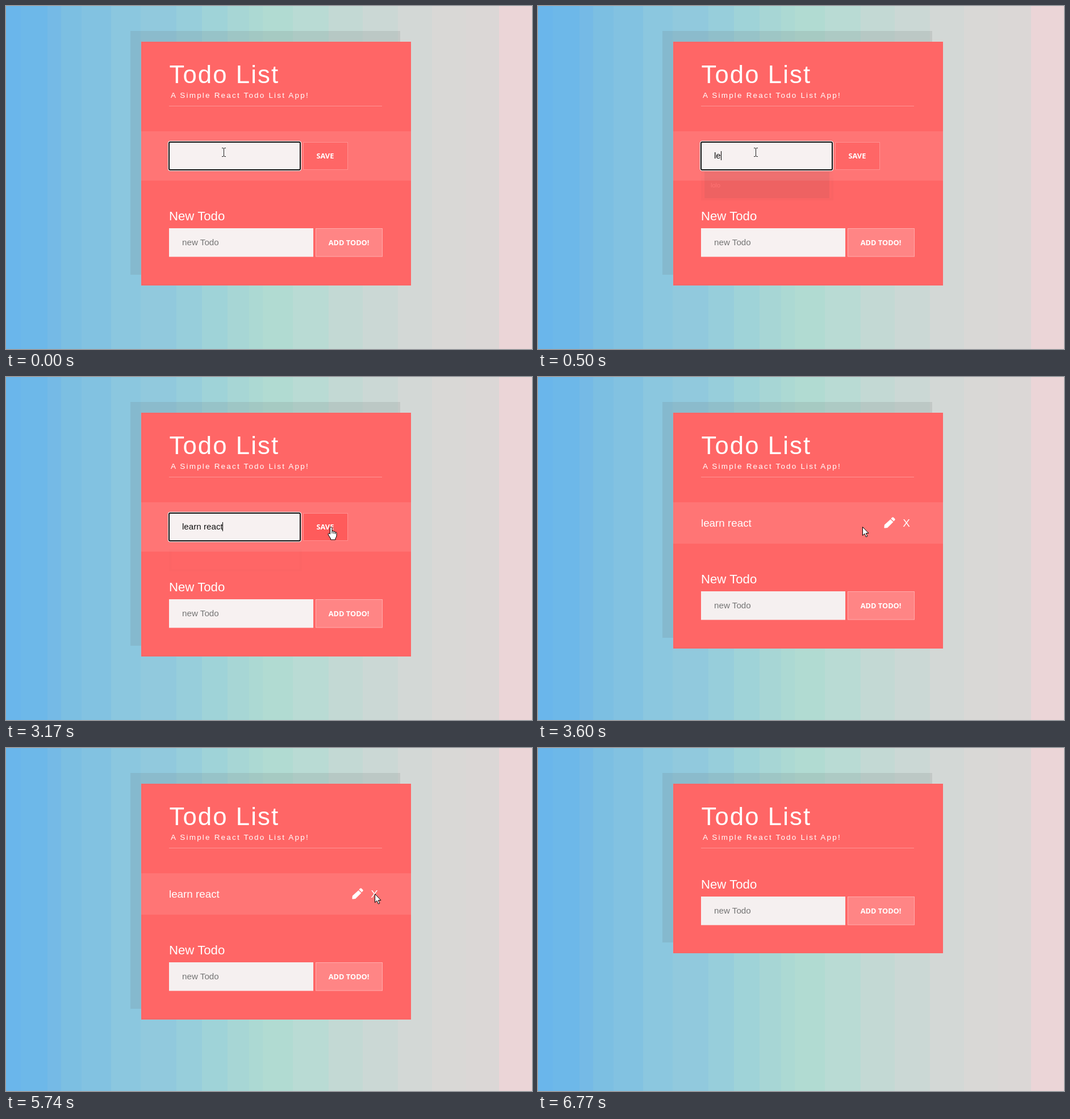
Animation, 926 px wide and 605 px high, one loop 7.42 s. Source, as an HTML page:

```html
<!DOCTYPE html>
<html lang="en">
<head>
<meta charset="utf-8">
<title>Todo List</title>
<style>
  html, body { margin: 0; width: 100%; height: 100%; overflow: hidden; }
  svg { display: block; width: 100%; height: 100%; font-family: "Liberation Sans", Arial, sans-serif; fill: #fff; }
  .button { font: bold 12.8px "Open Sans", sans-serif; }
  .field { font-size: 15.2px; }
  .cursor { fill: #fff; stroke: #000; stroke-linejoin: round; }
</style>
</head>
<body>
<svg viewBox="0 0 926 605">
  <g id="backdrop"></g>
  <rect id="shadow" x="219" y="44" width="475" fill="#646464" fill-opacity=".14"/>
  <rect id="card" x="238" y="63" width="475" fill="#f66"/>

  <text x="287.5" y="136" font-size="43.7" letter-spacing="2.1">Todo List</text>
  <text x="290" y="162" font-size="13.5" letter-spacing="2.18">A Simple React Todo List App!</text>
  <rect x="287" y="176" width="375" height="1" opacity=".3"/>

  <g id="editor">
    <rect x="238" y="221" width="475" height="87" fill="#ff7575"/>
    <rect x="285" y="238" width="235" height="53" rx="4"/>
    <rect x="287" y="240" width="231" height="49" rx="2" fill="#f7f1f1" stroke="#101010" stroke-width="2"/>
    <text id="draft" class="field" x="310" y="269" fill="#111"></text>
    <rect id="caret" y="256" width="1" height="16" fill="#000"/>
    <rect id="save" x="523.5" y="240.5" width="78" height="48" stroke="#ff9090"/>
    <text class="button" x="546.5" y="268.5">SAVE</text>
    <rect id="residue" x="289.5" y="306" width="229" height="35" fill="none" stroke="#000" stroke-width="4" opacity=".012"/>
    <g id="popup">
      <rect x="287" y="292" width="233" height="51" fill="#000" opacity=".12"/>
      <rect x="293" y="292" width="220" height="47" fill="#3b3b3b"/>
      <text x="304" y="320" font-size="11">lolo</text>
    </g>
  </g>

  <g id="item">
    <rect x="238" y="221" width="475" height="73" fill="#ff7575"/>
    <text x="287" y="264" font-size="18.8">learn react</text>
    <path transform="translate(609.3 247)" d="M11.3 3.9 16.1 8.7 5.8 19 1.4 19.5Q-.1 19.7 .1 18.2L.6 13.8ZM18.8 3.1 16.6.8Q15.3-.4 14 .8L12.1 2.8 16.9 7.6 18.8 5.6Q20 4.4 18.8 3.1Z"/>
    <text x="642.3" y="264" font-size="19">X</text>
  </g>

  <g id="form">
    <text x="287" y="378" font-size="22.2">New Todo</text>
    <rect id="newField" x="287" y="392" width="254" height="50.4"/>
    <text class="field" x="310" y="422" fill="#757575">new Todo</text>
    <rect x="545.5" y="392.5" width="117" height="49.4" fill="#ff8585" stroke="#ffadad"/>
    <text class="button" x="567.7" y="421.5">ADD TODO!</text>
  </g>

  <g id="beam"><path d="M-3-7.5H-1L.5-6.5 2-7.5H4M.5-6.5V6.5M-3 7.5H-1L.5 6.5 2 7.5H4" fill="none" stroke="#222"/></g>
  <g id="arrow" class="cursor"><path d="M.5.5V15.5L4 12.4 6.4 18 8.8 17 6.4 11.5H11Z"/></g>
  <g id="hand" class="cursor">
    <path d="M-1.5 12V1.5Q-1.5-.3 .3-.3T2 1.5V7Q4.3 5.7 5 7.8 7.2 6.8 7.7 8.7 10 8 10 10.5V15Q9.5 18 8 19.5V22H-.5V20L-4.8 13Q-5.3 10.5-3 10.7Z"/>
    <path d="M2 7V11M5 8V11.5M7.7 9V12" fill="none"/>
  </g>
</svg>
<script>
const LOOP = 7420;
const part = Object.fromEntries([...document.querySelectorAll("[id]")].map(el => [el.id, el]));
const show = (el, on) => el.style.display = on ? "" : "none";
const latest = (steps, t) => steps.filter(([start]) => start <= t).pop();

// Left edge and colour of each backdrop stripe
const stripes = [
  [0, "#6ab6eb"], [26, "#6db8e9"], [73, "#75bae6"], [97, "#7cbfe2"], [133, "#82c2e1"],
  [185, "#8bc7df"], [237, "#91c9dd"], [300, "#97cedb"], [345, "#9fd3d8"], [390, "#a7d6d5"],
  [428, "#acd9d3"], [452, "#b1dbd2"], [505, "#b9dbd4"], [568, "#c3d9d4"], [628, "#cbd8d5"],
  [690, "#d3d8d6"], [750, "#d9d8d6"], [810, "#dbd7d6"], [868, "#ebd5d7"]
];
part.backdrop.innerHTML = stripes
  .map(([x, color]) => `<rect x="${x}" width="${926 - x}" height="605" fill="${color}"/>`).join("");

const typing = [
  [0, ""], [250, "l"], [500, "le"], [640, "lea"], [760, "lear"], [1030, "learn"], [1200, "learn "],
  [1640, "learn re"], [1760, "learn rea"], [1880, "learn reac"], [2180, "learn react"]
];
const popupFade = [[0, 0], [380, 1], [500, .08], [640, 0]];
const pointer = [
  [0, "beam", 383, 258], [2930, "beam", 430, 270], [3050, "hand", 531, 275], [3170, "hand", 572, 265],
  [3480, "arrow", 571, 264], [3970, "arrow", 594, 274], [4090, "arrow", 622, 271], [4210, "arrow", 640, 260],
  [4460, "hand", 649, 257], [5740, "arrow", 649, 257], [6140, "arrow", 690, 312], [6260, "arrow", 760, 420],
  [6380, "arrow", 830, 520], [6500, "arrow", 877, 575], [6620, "arrow", 868, 598], [6770, "none", 0, 0]
];
// Start, card height, form offset
const layouts = [[0, 430, 0], [3600, 416, -14], [5860, 299, -130]];

const textWidth = document.createElement("canvas").getContext("2d");
textWidth.font = '15.2px "Liberation Sans", Arial, sans-serif';

function render(t) {
  const [phase, height, offset] = latest(layouts, t);
  part.card.setAttribute("height", height);
  part.shadow.setAttribute("height", height);
  part.form.setAttribute("transform", `translate(0 ${offset})`);
  part.newField.setAttribute("fill", phase ? "#f5f0f0" : "#f7f1f1");
  show(part.editor, phase === 0);
  show(part.item, phase === 3600);

  const draft = latest(typing, t)[1];
  part.draft.textContent = draft;
  part.caret.setAttribute("x", Math.round(310 + textWidth.measureText(draft).width - .3));
  show(part.caret, draft && !(t >= 1030 && t < 1200) && !(t >= 2680 && t < 2930));
  part.popup.setAttribute("opacity", latest(popupFade, t)[1]);
  show(part.residue, t >= 500);
  part.save.setAttribute("fill", t >= 3050 ? "#ff5b5b" : "#f66");

  const [, kind, x, y] = latest(pointer, t);
  for (const name of ["beam", "arrow", "hand"]) show(part[name], name === kind);
  if (part[kind]) part[kind].setAttribute("transform", `translate(${x} ${y})`);
}

const begin = performance.now();
function tick() {
  render((performance.now() - begin) % LOOP);
  requestAnimationFrame(tick);
}
tick();
</script>
</body>
</html>
```
